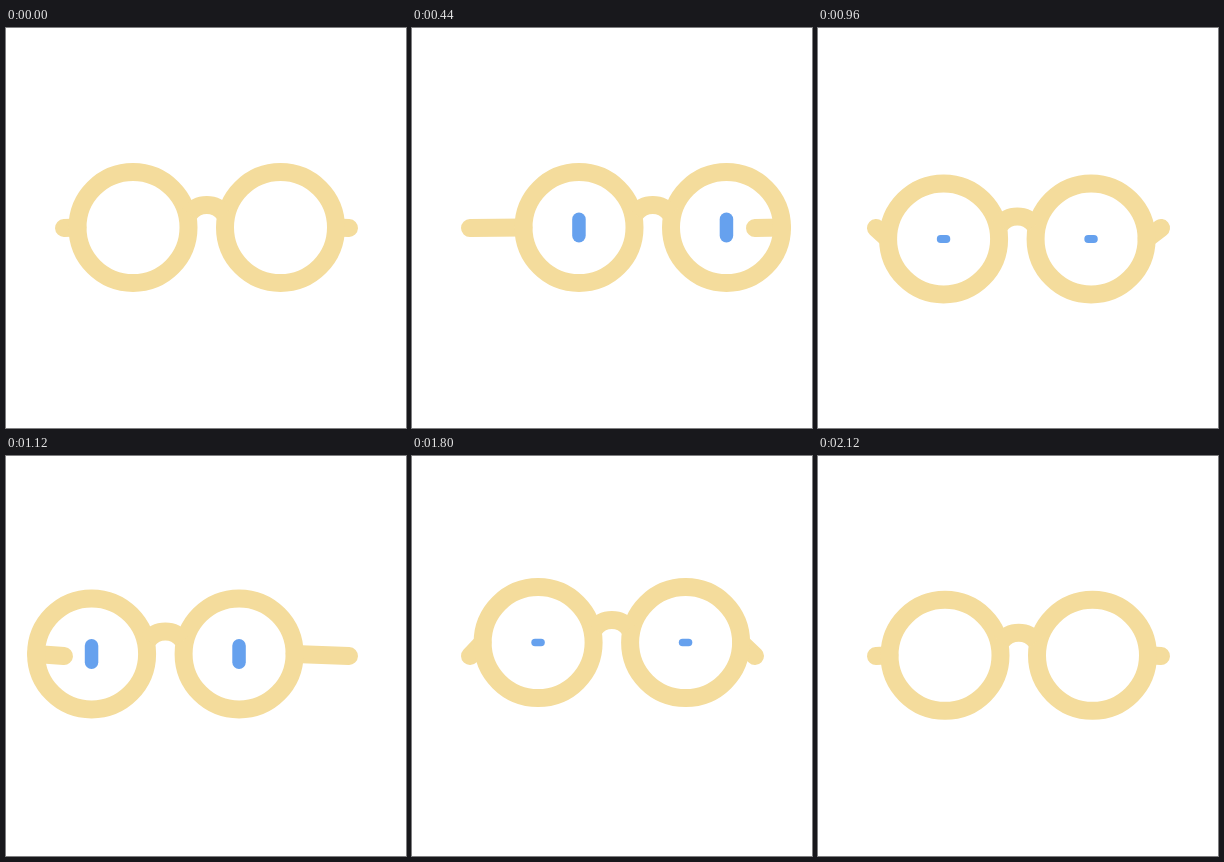
An HTML page for the animation above (2.2 s loop, 400x400 px).

```html
<!DOCTYPE html>
<html lang="en">
<head>
<meta charset="utf-8">
<title>Glasses looking around</title>
<style>
  html, body { margin: 0; width: 100%; height: 100%; overflow: hidden; background: #fff; }
  svg { display: block; width: 100%; height: 100%; }
  .frame { fill: none; stroke: #f4dc9c; stroke-width: 18; stroke-linecap: round; }
  .eye { fill: #66a1ee; }
</style>
</head>
<body>
<svg viewBox="0 0 400 400">
  <g class="frame">
    <line id="leftArm" x1="58" y1="200"/>
    <line id="rightArm" x1="343" y1="200"/>
  </g>
  <g id="face">
    <g class="frame">
      <circle cx="127" cy="199.5" r="55.5"/>
      <circle cx="274.5" cy="199.5" r="55.5"/>
      <path d="M183 186A22 22 0 0 1 218.5 186" stroke-linecap="butt"/>
    </g>
    <rect class="eye" x="120.2" width="13.5"/>
    <rect class="eye" x="267.7" width="13.5"/>
  </g>
</svg>
<script>
  const LOOP = 2200;
  const CENTER_Y = 199.5;
  const REACH = 40;      // sideways distance while looking right or left
  const OVERSHOOT = 4.4; // extra distance before and after a swing
  const HOP = 20;        // height of the jump

  const byId = id => document.getElementById(id);
  const face = byId("face");
  const leftArm = byId("leftArm");
  const rightArm = byId("rightArm");
  const eyes = document.querySelectorAll(".eye");

  const setAttrs = (node, attrs) => {
    for (const name in attrs) node.setAttribute(name, attrs[name]);
  };
  const clamp = u => Math.min(1, Math.max(0, u));
  const slowStart = k => k * k;
  const slowEnd = k => 1 - (1 - k) ** 2;
  const arch = k => 4 * k * (1 - k);

  // Each look winds up, swings along a curve and settles.
  function look(t, start, windup, swing, settle) {
    const ease = (from, length) => (1 - Math.cos(Math.PI * clamp((t - from) / length))) / 2;
    return {
      wind: ease(start, windup),
      swing: ease(start + windup, swing),
      settle: ease(start + windup + swing, settle)
    };
  }

  function offsetAt(t) {
    const right = look(t, 0, 120, 130, 190);
    const left = look(t, 760, 100, 198, 102);
    const back = look(t, 1520, 100, 240, 280);
    const side = REACH + OVERSHOOT;
    return {
      x: (REACH + 0.8) * slowStart(right.swing) - 0.8 * right.settle
        + OVERSHOOT * (left.wind + left.settle - back.wind)
        + side * (slowEnd(back.swing) - 2 * left.swing),
      y: HOP * (back.settle - right.wind)
        + (HOP + 8.5) * slowEnd(right.swing) - 8.5 * right.settle
        + 5 * (left.settle - left.wind) + 16.5 * arch(left.swing)
        + 7 * back.wind - (HOP + 7) * slowStart(back.swing)
    };
  }

  function draw(t) {
    const { x, y } = offsetAt(t);
    face.setAttribute("transform", `translate(${x} ${y})`);
    setAttrs(leftArm, { x2: 71.5 + x, y2: CENTER_Y + y });
    setAttrs(rightArm, { x2: 330 + x, y2: CENTER_Y + y });

    // The eyes narrow as the face passes the middle.
    const height = 7 + 23 * clamp(Math.abs(x) / REACH);
    const shown = t >= 120 && t < 1820;
    for (const eye of eyes) {
      setAttrs(eye, {
        y: CENTER_Y - height / 2,
        height,
        rx: Math.min(6.75, height / 2),
        visibility: shown ? "visible" : "hidden"
      });
    }
  }

  const start = performance.now();
  function tick() {
    draw((performance.now() - start) % LOOP);
    requestAnimationFrame(tick);
  }
  tick();
</script>
</body>
</html>
```
